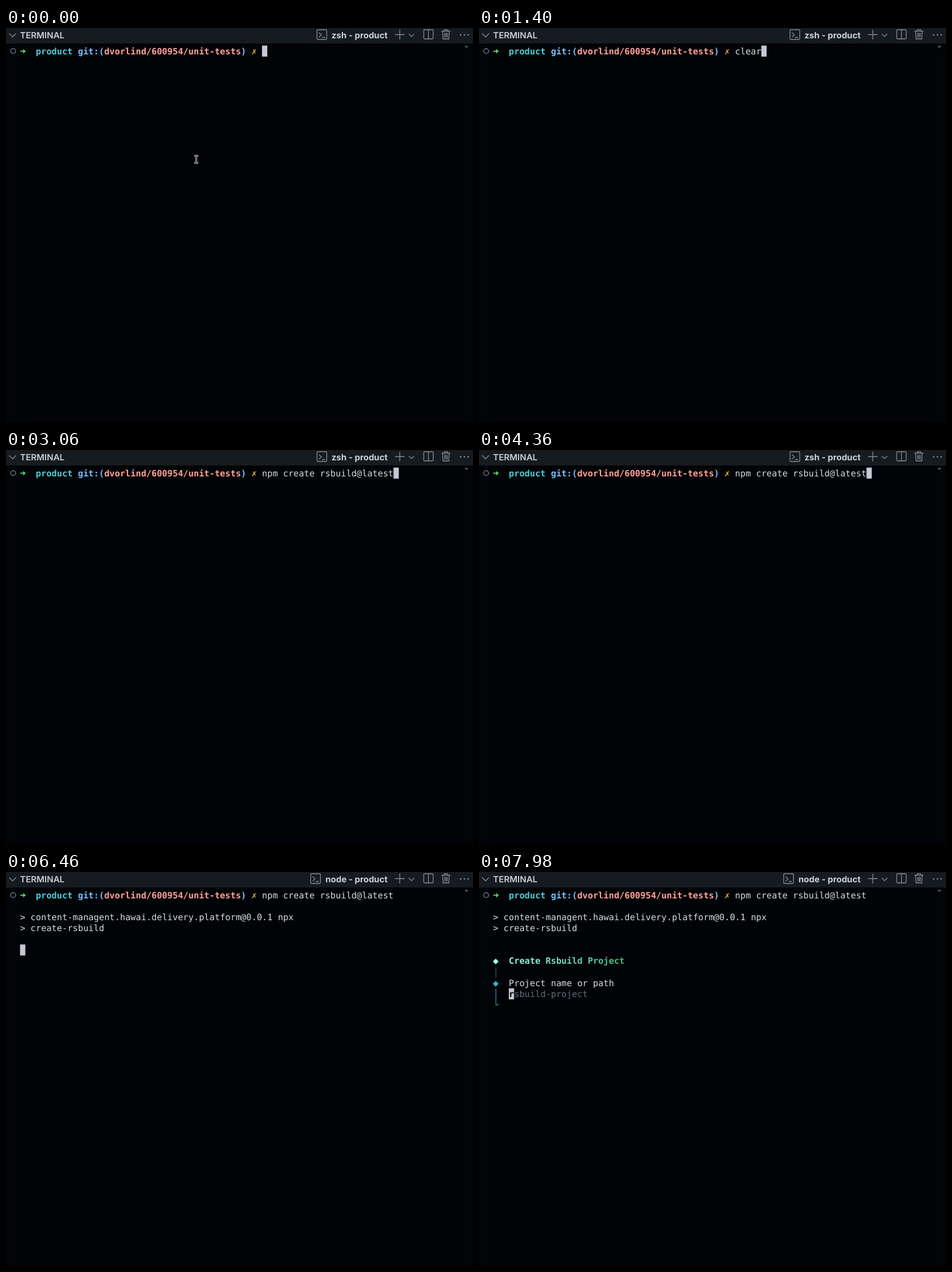
An HTML page for the animation above (8 s loop, 815x687 px).

```html
<!DOCTYPE html>
<html lang="en">
<head>
<meta charset="utf-8">
<title>Terminal</title>
<style>
  html, body { margin: 0; width: 100%; height: 100%; overflow: hidden; background: #010306; }
  svg { display: block; width: 815px; height: 687px; }
  text { white-space: pre; text-rendering: geometricPrecision; }
  .term { font: 15.25px "DejaVu Sans Mono", "Liberation Mono", monospace; fill: #d6dde4; }
  .bold { font-weight: 700; }
  .ui { font: 600 15px Inter, "Open Sans", sans-serif; fill: #c9d1d9; }
  .ui.bold { font-weight: 700; }
  .icon { fill: none; stroke: #858d96; stroke-width: 1.3; }
</style>
</head>
<body>
<svg viewBox="0 0 815 687">
  <defs>
    <linearGradient id="mint" gradientUnits="userSpaceOnUse" x1="24" x2="254" y1="0" y2="0">
      <stop stop-color="#a4fff0"/>
      <stop offset="1" stop-color="#3fb886"/>
    </linearGradient>
  </defs>
  <rect width="815" height="687" fill="#010306"/>
  <path d="M0 27h24v660H0zM801 27h14v660h-14z" fill="#010508"/>
  <rect width="815" height="27" fill="#161b1f"/>

  <path class="icon" d="M5.500 9.500l6 6 6-6"/>
  <text class="ui" x="24.500" y="17.500">TERMINAL</text>
  <g class="icon">
    <g id="shellIcon">
      <rect x="542.700" y="3" width="17" height="17" rx="1.500"/>
      <path d="M546 8l4.500 4-4.500 4M551.500 16.500h5.500"/>
    </g>
    <path d="M679 11.500h16.500M687.200 3v17M703 10.500l4.700 4.700 4.700-4.700"/>
    <rect x="729" y="3" width="16.500" height="16" rx="1.500"/>
    <path d="M737.300 3v16M760 5.500h15.500M765 5.500v-2.700h5.500v2.700M762 5.500l.700 13.500h10.100l.700-13.500M765.500 8.500v8M767.800 8.500v8M770.100 8.500v8"/>
  </g>
  <g fill="#8b949e">
    <circle cx="793.500" cy="12" r="1.300"/>
    <circle cx="800" cy="12" r="1.300"/>
    <circle cx="806.500" cy="12" r="1.300"/>
  </g>
  <text id="title" class="ui bold" x="666" y="17.500" text-anchor="end"></text>

  <circle cx="12.500" cy="40.300" r="4.300" fill="none" stroke="#6e7681" stroke-width="1.500"/>
  <path d="M801 31h5v3h-5z" fill="#4b5148"/>
  <path d="M25 39.500h5v-3l4.500 4-4.500 4v-3h-5z" fill="#56d364"/>

  <g id="prompt"></g>
  <text id="command" class="term"></text>
  <g id="output"></g>
  <g id="wizard">
    <path d="M29.200 151l5 5-5 5-5-5z" fill="#a4fff0"/>
    <path d="M29.500 166v18" stroke="#484f58" stroke-width="1.300"/>
    <path d="M29.200 190l5 5-5 5-5-5z" fill="#2fb9c6"/>
    <path d="M29.500 203.500v28h4.500" fill="none" stroke="#2599a5" stroke-width="1.300"/>
  </g>
  <rect id="cursor" width="9.200" height="19.200" fill="#c3cad4"/>
  <text id="cursorChar" class="term bold" style="fill:#010409"></text>

  <g id="pointer" fill="none">
    <path d="M328.500 223h2.500l1 1 1-1h2.500M332 224v10M328.500 235h2.500l1-1 1 1h2.500" stroke="#d8d8d8" stroke-width="2.800"/>
    <path d="M329 223h2l1 1 1-1h2M332 224v10M329 235h2l1-1 1 1h2" stroke="#111" stroke-width="1"/>
  </g>
</svg>
<script>
const LOOP = 8000;
const CELL = 9.18, LINE = 19.13, LEFT = 24.5, TOP = 30.7;
const COMMAND_COL = 46;
const el = id => document.getElementById(id);

function place(text, col, row) {
  text.setAttribute('x', LEFT + col * CELL);
  text.setAttribute('y', TOP + row * LINE + 15);
}

function write(parent, col, row, string, fill, bold) {
  const text = document.createElementNS('http://www.w3.org/2000/svg', 'text');
  text.setAttribute('class', bold ? 'term bold' : 'term');
  if (fill) text.style.fill = fill;
  text.textContent = string;
  place(text, col, row);
  el(parent).append(text);
}

write('prompt', 3, 0, 'product', '#4ccdd6', true);
write('prompt', 11, 0, 'git:(', '#79c0ff', true);
write('prompt', 16, 0, 'dvorlind/600954/unit-tests', '#ffa198', true);
write('prompt', 42, 0, ')', '#79c0ff', true);
write('prompt', 44, 0, '✗', '#e3b341', true);
write('output', 0, 2, '> content-managent.hawai.delivery.platform@0.0.1 npx');
write('output', 0, 3, '> create-rsbuild');
write('wizard', 3, 6, 'Create Rsbuild Project', 'url(#mint)', true);
write('wizard', 3, 8, 'Project name or path');
write('wizard', 4, 9, 'sbuild-project', '#656c76');
place(el('command'), COMMAND_COL, 0);
place(el('cursorChar'), 3, 9);

const create = 'npm create rsbuild@latest';
const after = command => [COMMAND_COL + command.length, 0];

// Each step overrides the state left by the steps before it.
const steps = [
  { at: 0, shell: 'zsh', command: '', cursor: after(''), pointer: true, output: false, wizard: false },
  { at: 960, command: 'clear', cursor: after('clear'), pointer: false },
  { at: 2000, command: create, cursor: after(create) },
  { at: 4800, cursor: [0, 1] },
  { at: 5100, shell: 'node' },
  { at: 6200, output: true, cursor: [0, 5] },
  { at: 6560, wizard: true, cursor: [3, 9] }
];

const show = (id, on) => el(id).setAttribute('visibility', on ? 'visible' : 'hidden');

function render(time) {
  const state = Object.assign({}, ...steps.filter(step => step.at <= time));
  const [col, row] = state.cursor;
  el('title').textContent = state.shell + ' - product';
  el('shellIcon').setAttribute('transform', `translate(${state.shell === 'node' ? -11 : 0} 0)`);
  el('command').textContent = state.command;
  el('cursor').setAttribute('x', LEFT + col * CELL);
  el('cursor').setAttribute('y', TOP + row * LINE);
  el('cursorChar').textContent = state.wizard ? 'r' : '';
  for (const id of ['pointer', 'output', 'wizard']) show(id, state[id]);
}

const start = performance.now();
function tick() {
  render((performance.now() - start) % LOOP);
  requestAnimationFrame(tick);
}
tick();
</script>
</body>
</html>
```
